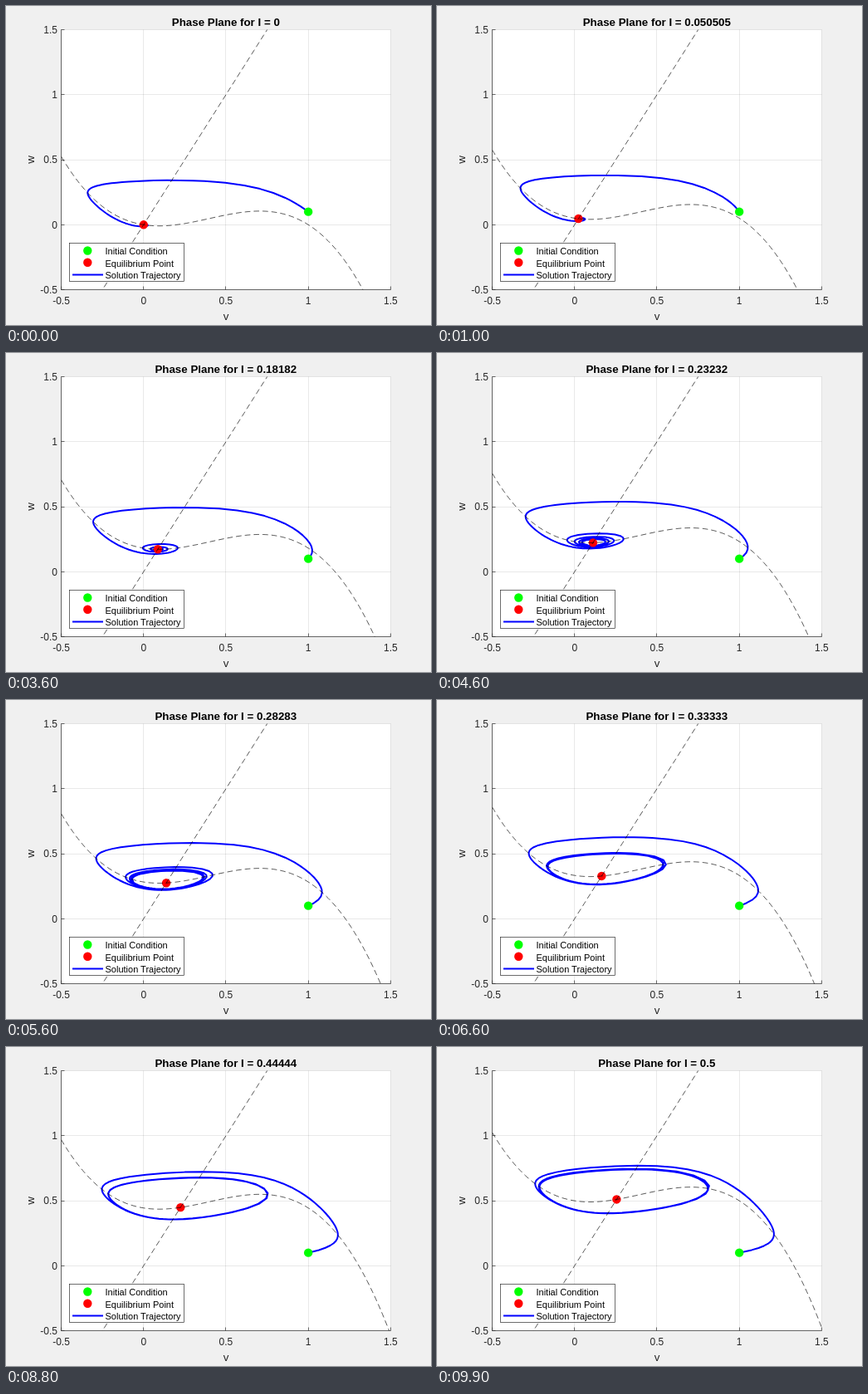
An HTML page with a canvas that plays this animation: 512x384 px, repeating every 10 s.

```html
<!DOCTYPE html>
<html lang="en">
<head>
<meta charset="utf-8">
<title>Phase Plane</title>
<style>
html, body { margin: 0; width: 100%; height: 100%; overflow: hidden; background: #f0f0f0; }
canvas, svg { position: absolute; left: 0; top: 0; width: 512px; height: 384px; }
text { font-family: "Liberation Sans", Arial, sans-serif; fill: #262626; font-size: 12px; }
.label { font-size: 13.33px; text-anchor: middle; }
.title { font-weight: bold; fill: #000; }
.legend { font-size: 11px; fill: #000; }
</style>
</head>
<body>
<canvas id="plot" width="512" height="384"></canvas>
<svg id="texts" viewBox="0 0 512 384"></svg>
<script>
const ctx = document.getElementById('plot').getContext('2d');
const svg = document.getElementById('texts');

const STEPS = 100, STEP_MS = 100, I_MAX = 0.5, T_END = 100;
const A = 0.2, EPS = 0.1, GAMMA = 0.5;
const BOX = { l: 66.56, t: 28.6, r: 463.36, b: 341.56 };
const TICKS = [-0.5, 0, 0.5, 1, 1.5];
const START = [1, 0.1];
const INK = '#262626', GRID = 'rgba(38,38,38,0.15)';
const BLUE = '#0000ff', GREEN = '#00ff00', RED = '#ff0000';
const HAIR = 0.67, DASH = [6.7, 4];

const X = v => BOX.l + (v + 0.5) / 2 * (BOX.r - BOX.l);
const Y = w => BOX.b - (w + 0.5) / 2 * (BOX.b - BOX.t);
const crisp = p => Math.floor(p) + 0.5;

// FitzHugh-Nagumo model
const cubic = v => v * (v - A) * (1 - v);
const flow = ([v, w], I) => [cubic(v) - w + I, EPS * (v - GAMMA * w)];

function equilibrium(I) {
  let lo = -0.5, hi = 1;
  for (let i = 0; i < 40; i++) {
    const mid = (lo + hi) / 2;
    if (mid / GAMMA < cubic(mid) + I) lo = mid; else hi = mid;
  }
  return [lo, lo / GAMMA];
}

// Dormand-Prince 4(5): stages, error weights and dense output
const STAGES = [
  [1 / 5],
  [3 / 40, 9 / 40],
  [44 / 45, -56 / 15, 32 / 9],
  [19372 / 6561, -25360 / 2187, 64448 / 6561, -212 / 729],
  [9017 / 3168, -355 / 33, 46732 / 5247, 49 / 176, -5103 / 18656],
  [35 / 384, 0, 500 / 1113, 125 / 192, -2187 / 6784, 11 / 84]
];
const ERR = [71 / 57600, 0, -71 / 16695, 71 / 1920, -17253 / 339200, 22 / 525, -1 / 40];
const DENSE = [
  [1, -183 / 64, 37 / 12, -145 / 128],
  [0, 0, 0, 0],
  [0, 1500 / 371, -1000 / 159, 1000 / 371],
  [0, -125 / 32, 125 / 12, -375 / 64],
  [0, 9477 / 3392, -729 / 106, 25515 / 6784],
  [0, -11 / 7, 11 / 3, -55 / 28],
  [0, 3 / 2, -4, 5 / 2]
];
const RTOL = 1e-3, FLOOR = 1e-3, REFINE = 4;

const blend = (k, c, d) => c.reduce((sum, cj, j) => sum + cj * k[j][d], 0);
const advance = (y, k, c, h) => y.map((yd, d) => yd + h * blend(k, c, d));

function trajectory(I) {
  const hMax = T_END / 10;
  let t = 0, y = START, f = flow(y, I);
  const rate = Math.max(...y.map((q, d) => Math.abs(f[d]) / Math.max(Math.abs(q), FLOOR)));
  let h = Math.min(hMax, 0.8 * RTOL ** 0.2 / rate);
  const pts = [y];
  while (t < T_END) {
    h = Math.min(h, hMax);
    let failed = false, k, next, err;
    for (;;) {
      if (1.1 * h >= T_END - t) h = T_END - t;
      k = [f];
      for (const c of STAGES) {
        next = advance(y, k, c, h);
        k.push(flow(next, I));
      }
      err = h * Math.max(...y.map((q, d) =>
        Math.abs(blend(k, ERR, d)) / Math.max(Math.abs(q), Math.abs(next[d]), FLOOR)));
      if (err <= RTOL) break;
      h *= failed ? 0.5 : Math.max(0.1, 0.8 * (RTOL / err) ** 0.2);
      failed = true;
    }
    for (let i = 1; i < REFINE; i++) {
      const s = i / REFINE;
      const c = DENSE.map(r => s * (r[0] + s * (r[1] + s * (r[2] + s * r[3]))));
      pts.push(advance(y, k, c, h));
    }
    pts.push(next);
    t = h === T_END - t ? T_END : t + h;
    y = next;
    f = k[6];
    if (!failed) h /= Math.max(0.2, 1.25 * (err / RTOL) ** 0.2);
  }
  return pts;
}

function stroke(pts, color, width, dash = []) {
  ctx.strokeStyle = color;
  ctx.lineWidth = width;
  ctx.setLineDash(dash);
  ctx.beginPath();
  for (const [x, y] of pts) ctx.lineTo(x, y);
  ctx.stroke();
}

function dot(x, y, color) {
  ctx.fillStyle = color;
  ctx.beginPath();
  ctx.arc(x, y, 5.2, 0, 7);
  ctx.fill();
}

const toPixels = pts => pts.map(([v, w]) => [X(v), Y(w)]);
const sample = fn => Array.from({ length: 201 }, (_, i) => {
  const v = -0.5 + i / 100;
  return [v, fn(v)];
});

function drawAxes() {
  const l = crisp(BOX.l), r = crisp(BOX.r), t = crisp(BOX.t), b = crisp(BOX.b);
  ctx.fillStyle = '#f0f0f0';
  ctx.fillRect(0, 0, 512, 384);
  ctx.fillStyle = '#fff';
  ctx.fillRect(l, t, r - l, b - t);
  for (const q of TICKS) {
    const x = crisp(X(q)), y = crisp(Y(q));
    stroke([[x, t], [x, b]], GRID, HAIR);
    stroke([[l, y], [r, y]], GRID, HAIR);
  }
  for (const q of TICKS) {
    const x = crisp(X(q)), y = crisp(Y(q));
    stroke([[x, b], [x, b - 4]], INK, HAIR);
    stroke([[l, y], [l + 4, y]], INK, HAIR);
  }
  stroke([[l, t], [l, b], [r, b]], INK, HAIR);
}

function drawLegend() {
  ctx.fillStyle = '#fff';
  ctx.fillRect(76.5, 285.5, 138, 46);
  ctx.strokeStyle = INK;
  ctx.lineWidth = HAIR;
  ctx.setLineDash([]);
  ctx.strokeRect(76.5, 285.5, 138, 46);
  dot(98.3, 294.5, GREEN);
  dot(98.3, 308.8, RED);
  stroke([[80, 323.5], [117, 323.5]], BLUE, 2);
}

function draw(I) {
  drawAxes();
  ctx.save();
  ctx.beginPath();
  ctx.rect(BOX.l, BOX.t, BOX.r - BOX.l, BOX.b - BOX.t);
  ctx.clip();
  ctx.lineJoin = 'round';
  stroke(toPixels(trajectory(I)), BLUE, 2);
  const [v, w] = equilibrium(I);
  dot(X(v), Y(w), RED);
  dot(X(START[0]), Y(START[1]), GREEN);
  stroke(toPixels(sample(q => cubic(q) + I)), '#000', HAIR, DASH);
  stroke(toPixels(sample(q => q / GAMMA)), '#000', HAIR, DASH);
  ctx.restore();
  drawLegend();
  title.textContent = 'Phase Plane for I = ' + Number(I.toPrecision(5));
}

function addText(str, x, y, cls = '', anchor = '') {
  const el = document.createElementNS('http://www.w3.org/2000/svg', 'text');
  el.setAttribute('x', x);
  el.setAttribute('y', y);
  if (cls) el.setAttribute('class', cls);
  if (anchor) el.setAttribute('text-anchor', anchor);
  el.textContent = str;
  svg.append(el);
  return el;
}

for (const q of TICKS) {
  addText(q, X(q), 359.3, '', 'middle');
  addText(q, 62, Y(q) + 4.4, '', 'end');
}
addText('v', 265, 378, 'label');
addText('w', 0, 0, 'label').setAttribute('transform', 'translate(34 185) rotate(-90)');
['Initial Condition', 'Equilibrium Point', 'Solution Trajectory'].forEach((s, i) =>
  addText(s, 119.5, 299.2 + 14.3 * i, 'legend'));
const title = addText('', 264.8, 23.6, 'label title');

let shown = -1;
function tick(now) {
  const k = Math.floor(now / STEP_MS) % STEPS;
  if (k !== shown) {
    shown = k;
    draw(I_MAX * k / (STEPS - 1));
  }
  requestAnimationFrame(tick);
}
tick(performance.now());
</script>
</body>
</html>
```
